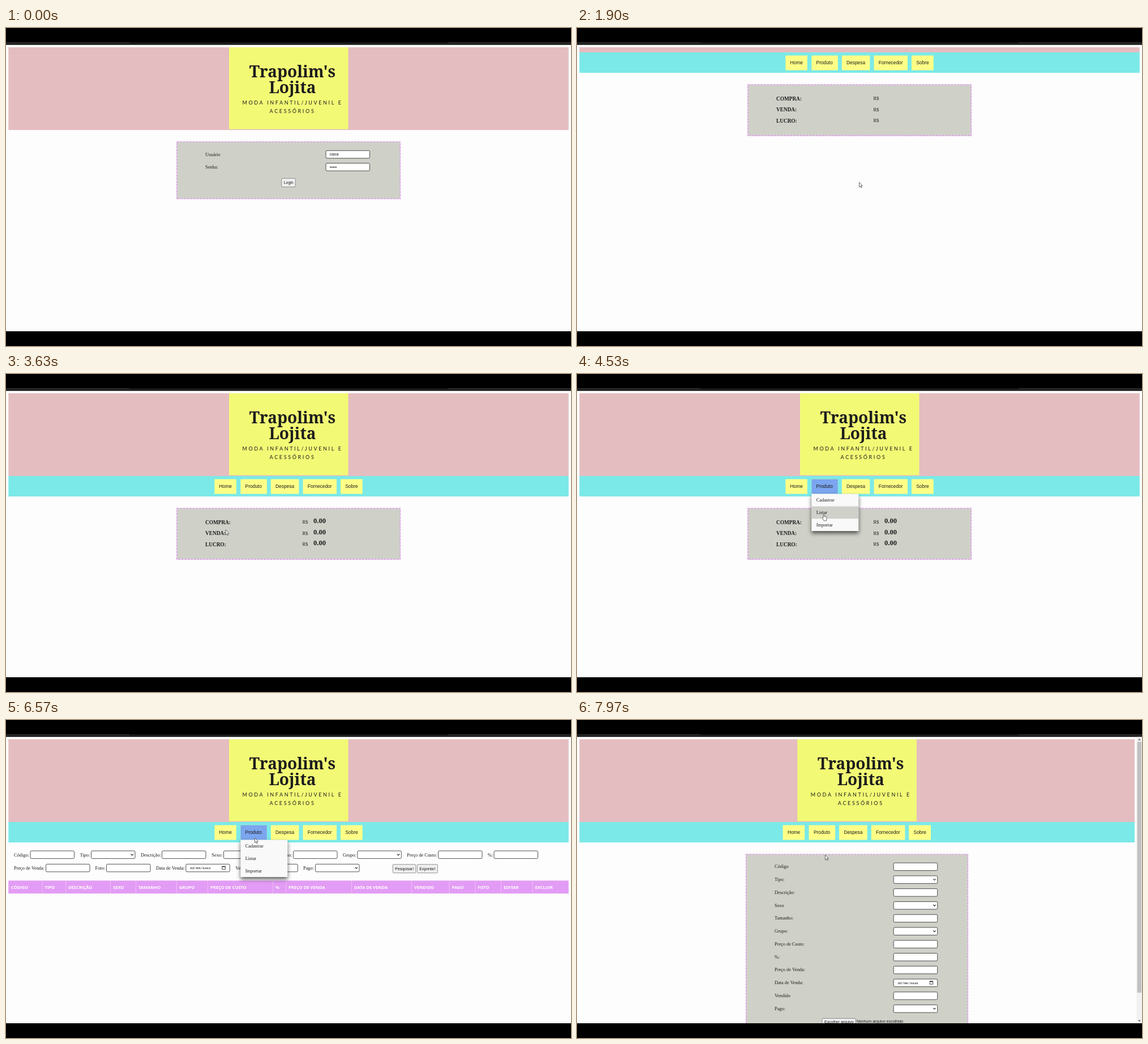
Animation, 998 px wide and 561 px high, one loop 8 s. Source, as an HTML page:

```html
<!DOCTYPE html>
<html lang="pt-BR">
<head>
<meta charset="utf-8">
<title>Loja</title>
<style>
  html, body { margin: 0; width: 100%; height: 100%; overflow: hidden; background: #000; }
  svg { display: block; width: 998px; height: 561px; }
  text { white-space: pre; fill: #1c1c1c; }
  .serif { font: 8.35px "Liberation Serif", serif; }
  .label { font: bold 9.3px "Liberation Serif", serif; }
  .value { font: bold 12.5px "Liberation Serif", serif; }
  .nav { font: 8.35px "Liberation Sans", sans-serif; }
  .small { font: 6.95px "Liberation Sans", sans-serif; }
  .date { font: italic 6.1px "Liberation Mono", monospace; }
  .th { font: bold 7.6px "Open Sans", sans-serif; fill: #fff; }
  .brand { font: 600 28px "Noto Serif", serif; text-anchor: middle; }
  .tag { font: 9px Lato, sans-serif; letter-spacing: 2.65px; text-anchor: middle; }

  .step { animation: 8s step-end infinite; }
  #login { animation-name: login; }
  #loading { animation-name: loading; }
  #dash { animation-name: dash; }
  #list { animation-name: list; }
  #form { animation-name: form; }
  #menu { animation-name: menu; }
  #hover { animation-name: hover; }
  #arrow { animation-name: arrow; }
  #hand { animation-name: hand; }
  #press { animation-name: press; }
  #cursor { animation: move 8s ease-in-out infinite; }

  @keyframes login { 0% { opacity: 1 } 20%, 100% { opacity: 0 } }
  @keyframes loading { 0% { opacity: 0 } 20% { opacity: 1 } 26%, 100% { opacity: 0 } }
  @keyframes dash { 0% { opacity: 0 } 26% { opacity: 1 } 60.625%, 100% { opacity: 0 } }
  @keyframes list { 0% { opacity: 0 } 60.625% { opacity: 1 } 88.75%, 100% { opacity: 0 } }
  @keyframes form { 0% { opacity: 0 } 88.75%, 100% { opacity: 1 } }
  @keyframes menu {
    0% { opacity: 0 } 49.5% { opacity: 1 } 60.625% { opacity: 0 }
    81% { opacity: 1 } 88.75%, 100% { opacity: 0 }
  }
  @keyframes hover {
    0% { opacity: 0; transform: none }
    51.5% { opacity: 1; transform: none }
    54.5% { opacity: 1; transform: translateY(22px) }
    60.625% { opacity: 0; transform: none }
    83.5%, 100% { opacity: 1; transform: none }
  }
  @keyframes arrow {
    0% { opacity: 0 } 4% { opacity: 1 } 51.5% { opacity: 0 } 60.625% { opacity: 1 }
    83.5% { opacity: 0 } 88.75%, 100% { opacity: 1 }
  }
  @keyframes hand {
    0% { opacity: 0 } 51.5% { opacity: 1 } 60.625% { opacity: 0 }
    83.5% { opacity: 1 } 88.75%, 100% { opacity: 0 }
  }
  @keyframes press { 0% { fill: #efefef } 14% { fill: #e0e0e0 } 20%, 100% { fill: #efefef } }
  @keyframes move {
    0%, 4% { transform: translate(540px, 505px) }
    15%, 30% { transform: translate(498px, 272px) }
    35.875% { transform: translate(352.5px, 341px) }
    38.5% { transform: translate(340px, 406px) }
    42% { transform: translate(352px, 322px) }
    49.5% { transform: translate(437px, 209px) }
    56.625%, 60.625% { transform: translate(434px, 247px) }
    67.875%, 73% { transform: translate(805.3px, 357px) }
    81%, 82.125% { transform: translate(439px, 208px) }
    86%, 88.75% { transform: translate(438px, 226px) }
    92%, 100% { transform: translate(438px, 238px) }
  }
</style>
</head>
<body>
<svg id="stage" viewBox="0 0 998 561"></svg>
<script>
const rect = (x, y, w, h, fill, extra = '') =>
  `<rect x="${x}" y="${y}" width="${w}" height="${h}" fill="${fill}" ${extra}/>`;
const text = (x, y, cls, s) => `<text x="${x}" y="${y}" class="${cls}">${s}</text>`;
const group = (s, dx, dy = 0) => `<g transform="translate(${dx} ${dy})">${s}</g>`;
const page = (id, s) => `<g id="${id}" class="step">${rect(0, 29.5, 998, 506, '#fdfdfd')}${s}</g>`;

const panel = (x, y, w, h) => rect(x + .6, y + .6, w - 1.2, h - 1.2, '#cfd1c8',
  'stroke="#de98f0" stroke-width="1.3" stroke-dasharray="4 1.6"');
const button = (x, y, w, h, s, extra = '') =>
  rect(x, y, w, h, '#efefef', `stroke="#777" stroke-width=".8" rx="1.2" ${extra}`) +
  text(x + 4, y + h / 2 + 2.5, 'small', s);

function field(x, y, kind) {
  let s = rect(x + .5, y + .5, 77.5, 13.5, '#fff', 'stroke="#333" stroke-width=".85" rx="2"');
  if (kind === 'select')
    s += `<path d="M${x + 70.5} ${y + 6}l2.2 2.2 2.2-2.2" fill="none" stroke="#222" stroke-width="1.1"/>`;
  if (kind === 'date')
    s += text(x + 7.5, y + 9.3, 'date', 'dd/mm/aaaa') +
      rect(x + 64.5, y + 4.5, 5.5, 5, 'none', 'stroke="#222" stroke-width=".8"') +
      rect(x + 64.5, y + 4, 5.5, 1.5, '#222');
  return s;
}

const logo = rect(394, 34, 210.5, 144.5, '#f2fa75') +
  text(506, 87, 'brand', "Trapolim's") + text(506, 115, 'brand', 'Lojita') +
  text(506, 135, 'tag', 'MODA INFANTIL/JUVENIL E') + text(506, 150, 'tag', 'ACESSÓRIOS');

const navItems = [['Home', 368.3, 38.5], ['Produto', 414.3, 46.5], ['Despesa', 467.8, 49.5],
  ['Fornecedor', 524.5, 59.5], ['Sobre', 591, 38.7]];
const navButton = ([s, x, w], fill) =>
  rect(x, 185.5, w, 26, fill) + text(x + 8.3, 201, 'nav', s);
const nav = navItems.map(item => navButton(item, '#fefe87')).join('');

const banner = width => rect(4.3, 34, width, 146, '#e4bdc0');
const bar = width => rect(4.3, 180, width, 36, '#7be9e7');

const loginPage = banner(989.5) + logo + panel(301, 200, 396, 102) +
  text(352, 225.5, 'serif', 'Usuário') + text(352, 247.7, 'serif', 'Senha:') +
  field(564.5, 215.8) + field(564.5, 238) + text(571.5, 225.3, 'small', 'caixa') +
  [0, 1, 2, 3, 4].map(i => `<circle cx="${573 + i * 2.5}" cy="245.4" r="1" fill="#222"/>`).join('') +
  button(486.7, 265.3, 24.6, 15, 'Login', 'id="press" class="step"');

const totals = filled => panel(301, 236.3, 396, 91.3) +
  ['COMPRA:', 'VENDA:', 'LUCRO:'].map((s, i) => {
    const y = 264.8 + i * 19.6;
    return text(352, y, 'label', s) + text(523.5, y - .8, 'serif', 'R$') +
      (filled ? text(543, y - 1.6, 'value', '0.00') : '');
  }).join('');

const loadingPage = rect(4.3, 34, 989.5, 9, '#e4bdc0') + group(bar(989.5) + nav + totals(false), 0, -137);
const dashPage = banner(989.5) + logo + bar(989.5) + nav + totals(true);

const filters = [
  [['Código:', 14, 42.5], ['Tipo:', 130.5, 150, 'select'], ['Descrição:', 238, 275],
    ['Sexo:', 363.3, 384, 'select'], ['Tamanho:', 472, 507], ['Grupo:', 595, 620.3, 'select'],
    ['Preço de Custo:', 708.3, 763], ['%:', 851, 861.5]],
  [['Preço de Venda:', 14, 70], ['Foto:', 157.5, 177], ['Data de Venda:', 265, 317.3, 'date'],
    ['Vendido:', 405.3, 437.3], ['Pago:', 525, 546, 'select']]
];
const columns = [['CÓDIGO', 9], ['TIPO', 68.5], ['DESCRIÇÃO', 110], ['SEXO', 189], ['TAMANHO', 233.7],
  ['GRUPO', 306], ['PREÇO DE CUSTO', 361], ['%', 476], ['PREÇO DE VENDA', 499], ['DATA DE VENDA', 615],
  ['VENDIDO', 721], ['PAGO', 787.5], ['FOTO', 833.3], ['EDITAR', 879], ['EXCLUIR', 934.5]];

const listPage = banner(989.5) + logo + bar(989.5) + nav +
  filters.map((row, i) => row.map(([s, x, fx, kind]) =>
    text(x, 240.6 + i * 23.4, 'serif', s) + field(fx, 230.4 + i * 23.4, kind)).join('')).join('') +
  button(683.3, 254.8, 40.5, 15, 'Pesquisar!') + button(726.3, 254.8, 36, 15, 'Exportar!') +
  rect(4.3, 283.3, 989.5, 22.8, '#e39cf5') +
  columns.map(([s, x], i) =>
    (i ? rect(x - 4.8, 283.3, .7, 22.8, '#f0ccf9') : '') + text(x, 297.5, 'th', s)).join('');

const formRows = [['Código'], ['Tipo:', 'select'], ['Descrição:'], ['Sexo', 'select'], ['Tamanho:'],
  ['Grupo:', 'select'], ['Preço de Custo:'], ['%:'], ['Preço de Venda:'], ['Data de Venda:', 'date'],
  ['Vendido'], ['Pago:', 'select']];
const scrollbar = rect(988.5, 29.5, 9.5, 506, '#f1f1f1') + rect(989.5, 38.5, 7.5, 442.5, '#c1c1c1') +
  '<path d="M991 35.5l2.3-2.6 2.3 2.6zM991 529.5l2.3 2.6 2.3-2.6z" fill="#555"/>';

const formPage = banner(980.7) + bar(980.7) + group(logo + nav, -4.7) + panel(298, 236.3, 393, 330) +
  formRows.map(([s, kind], i) => {
    const y = 259 + i * 22.77;
    return text(349, y + 2.3, 'serif', s) + field(558.7, y - 7.4, kind);
  }).join('') +
  button(433, 526.5, 59, 11, 'Escolher arquivo') + text(494, 534, 'small', 'Nenhum arquivo escolhido') +
  scrollbar;

const menu = `<g id="menu" class="step">${navButton(navItems[1], '#7ba5ef')}` +
  rect(414.3, 211.5, 83, 65.5, '#f9f9f9', 'style="filter:drop-shadow(0 4px 3.5px rgba(0,0,0,.62))"') +
  rect(414.3, 211.5, 83, 21.8, '#cfd0ca', 'id="hover" class="step"') +
  ['Cadastrar', 'Listar', 'Importar'].map((s, i) => text(422.7, 225 + i * 21.9, 'serif', s)).join('') + '</g>';

const cursor = `<g id="cursor" fill="#fff" stroke="#444" stroke-width=".8" stroke-linejoin="round">
  <path id="arrow" class="step" d="M.5 0V8.6L2.4 6.8 3.8 9.8 5.1 9.2 3.8 6.3H6.4Z"/>
  <path id="hand" class="step" d="M1 1.2Q2 0 2.8 1.2V4.4L6.6 5.2Q7.3 5.5 7.2 6.5L6.4 11.8H2.2L-.7 7.6Q-.5 6 1 7Z"/>
</g>`;

const frame = rect(0, 0, 998, 29.5, '#000') + rect(0, 25.5, 998, 3.5, '#1d1d1d') +
  rect(0, 25.5, 218, 1.2, '#383838') + rect(780, 25.5, 218, 1.2, '#383838') +
  rect(0, 535, 998, 26, '#000');

document.getElementById('stage').innerHTML =
  page('login', loginPage) + page('loading', loadingPage) + page('dash', dashPage) +
  page('list', listPage) + page('form', formPage) + menu + cursor + frame;
</script>
</body>
</html>
```
